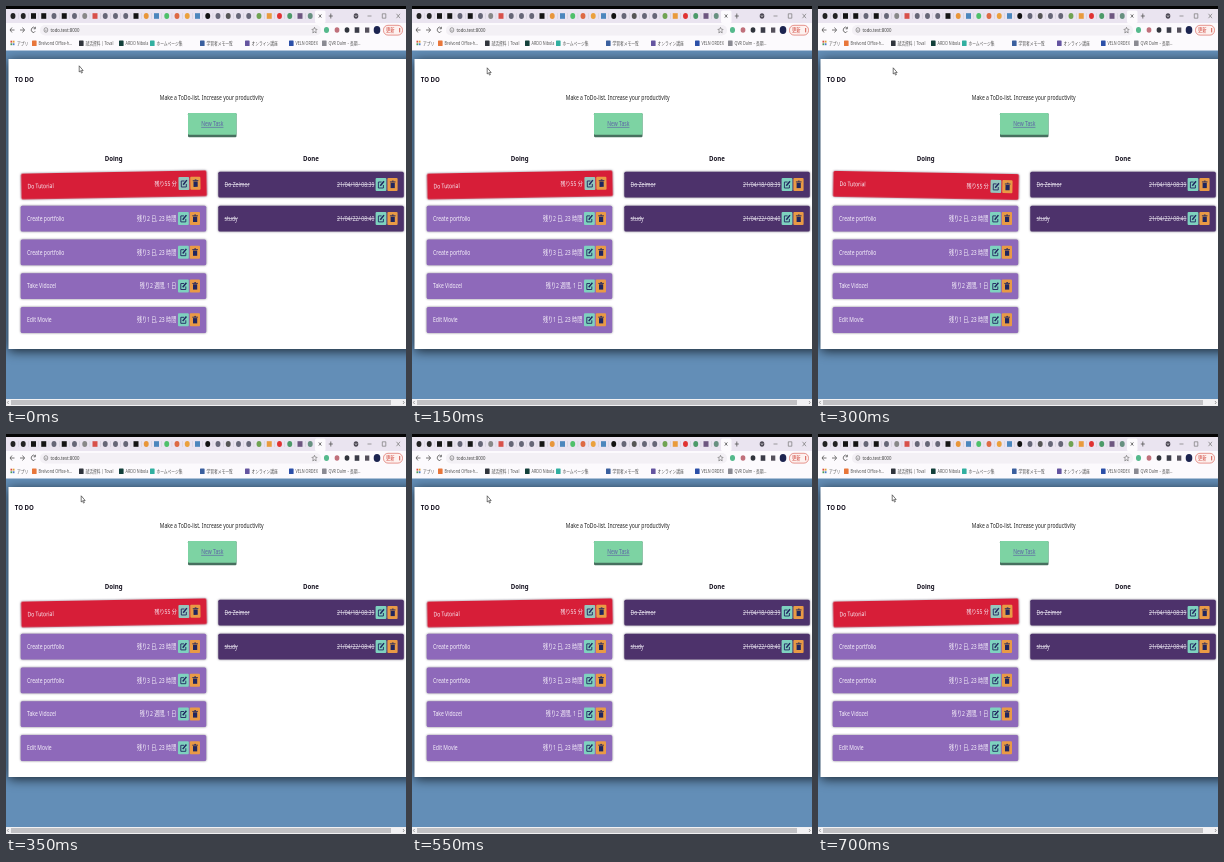
These frames come from a looping animation (400x400 px, 750 ms). An HTML page:

```html
<!DOCTYPE html>
<html lang="ja">
<head>
<meta charset="utf-8">
<style>
  html, body { margin: 0; width: 100%; height: 100%; overflow: hidden; }
  svg { display: block; width: 400px; height: 400px; font-family: "Noto Sans", "Noto Sans CJK JP", "Noto Sans CJK", sans-serif; }
  .panel { filter: drop-shadow(0 2px 6px rgba(0, 0, 0, .75)); }
  .card { filter: drop-shadow(0 .8px 1.3px rgba(20, 10, 40, .55)); }
</style>
</head>
<body>
<svg id="stage" viewBox="0 0 400 400"></svg>
<script>
const LOOP = 750, STEP = 50;
const SQUEEZE = 0.78; // the whole screen is shown narrower than it is tall

const rect = (x, y, w, h, fill, more = '') =>
  `<rect x="${x}" y="${y}" width="${w}" height="${h}" fill="${fill}" ${more}/>`;
const dot = (x, y, r, fill) =>
  `<ellipse cx="${x}" cy="${y}" rx="${r * .85}" ry="${r}" fill="${fill}"/>`;
const line = (d, color = '#555', width = .8) =>
  `<path d="${d}" fill="none" stroke="${color}" stroke-width="${width}"/>`;
const text = (x, y, str, fill, size = 6.5, more = '') =>
  `<text transform="translate(${x} ${y}) scale(${SQUEEZE} 1)" font-size="${size}" fill="${fill}" ${more}>${str}</text>`;

function actions(x, y, green) {
  const ink = '#20265f';
  return rect(x, y, 10.8, 13, green, 'rx="1"') + rect(x + 11.8, y, 10.2, 13, '#e99a45', 'rx="1"') +
    line(`M${x + 6} ${y + 4}h-3.2v6h5v-3`, ink, .9) +
    line(`M${x + 4.7} ${y + 7.8}l3.7 -4.6`, ink, 1.5) +
    rect(x + 15, y + 4.8, 4.2, 5.3, ink) +
    line(`M${x + 14.3} ${y + 3.9}h5.6m-3.6 -.8h1.7`, ink, .9);
}

function card(x, y, fill, title, when, done) {
  const strike = done ? 'text-decoration="line-through"' : '';
  const ink = done ? '#e5dfec' : '#f7f2fb';
  const right = x + (done ? 156 : 155.5);
  return rect(x, y, 185.5, 25.8, fill, 'rx="1.5" class="card"') +
    text(x + 6.3, y + 15, title, ink, 6.5, strike) +
    text(right, y + 15, when, ink, 6.5, `text-anchor="end" ${strike}`) +
    actions(x + 157.3, y + 6.2, fill === RED ? '#94c6bd' : '#7ed2bf');
}

function tabs() {
  const colors = ['#222', '#222', '#151515', '#151515', '#667', '#151515', '#667', '#888', '#d8504a', '#667',
    '#667', '#667', '#151515', '#e8963a', '#4b86bd', '#4fc06a', '#dd6a43', '#eba13c', '#4b86bd', '#111',
    '#667', '#555', '#667', '#667', '#70a352', '#e99b3c', '#e03232', '#4b9a68', '#6d5680', '#679080'];
  const square = [2, 3, 5, 8, 12, 14, 18, 25, 28];
  return colors.map((c, i) => {
    const x = 7 + i * 10.25;
    return (square.includes(i) ? rect(x - 2.5, 7.2, 5, 5.6, c) : dot(x, 10, 2.9, c)) +
      rect(x + 5, 7, .4, 6, '#c8c2d0');
  }).join('');
}

function bookmarks() {
  const items = [
    [26, '#e8763a', 'Brelvond Office-h…'], [73, '#30343c', '就活資料 | Toval'],
    [113, '#123f3a', 'ARDO Nibola'], [144, '#31afa0', 'ホームページ集'],
    [194, '#3a5f9e', '学習者メモ一覧'], [239, '#6454a0', 'オンライン講座'],
    [283, '#2b4fa8', 'VELN ORDEX'], [316, '#8a8a92', 'QVR Dalm・長期…']];
  const apps = ['#d84a3c', '#e0a030', '#4a9a55', '#4a7ac8'];
  return apps.map((c, i) => rect(4.5 + i % 2 * 2.3, 34.7 + (i >> 1) * 2.6, 1.7, 1.9, c)).join('') +
    text(11, 39.2, 'アプリ', '#555', 4.8) +
    items.map(([x, c, name]) => rect(x, 34.5, 4.6, 5.6, c, 'rx=".6"') +
      text(x + 6.5, 39.2, name, '#555', 4.8)).join('');
}

function browser() {
  return rect(0, 0, 400, 44.5, '#fcfafd') + rect(0, 3, 400, 14, '#eae4f0') + rect(0, 0, 400, 3, '#050505') +
    tabs() + rect(309, 4.5, 10.5, 12.5, '#fcfafd', 'rx="1.5"') +
    line('M312.8 8.4l2.6 3.2m0 -3.2l-2.6 3.2M324.8 7.5v5m-2 -2.5h4') +
    dot(350, 10, 2.7, '#4d4954') + line('M349 9.4l1 1.3l1 -1.3', '#fff', .7) +
    line('M361.5 10h4M376.3 7.8h3.5v4.4h-3.5zM390.5 7.8l3.5 4.4m0 -4.4l-3.5 4.4', '#777', .7) +
    line('M8.5 24h-4.5m2 -2.5l-2 2.5l2 2.5M14 24h4.5m-2 -2.5l2 2.5l-2 2.5') +
    line('M29 22.2a2.1 2.6 0 1 0 .2 3M29.4 20.8v2h-1.8') +
    rect(34, 19, 281, 10.5, '#f3f0f5', 'rx="5"') +
    line('M41.8 24a1.9 2.3 0 1 0 -3.8 0a1.9 2.3 0 1 0 3.8 0M39.9 23.6v1.8', '#666', .6) +
    text(44.5, 26.2, 'todo.test:8000', '#444', 5.5) +
    line('M308.5 21.3l.8 1.9l1.8 .2l-1.3 1.4l.4 2.1l-1.7 -1.1l-1.7 1.1l.4 -2.1l-1.3 -1.4l1.8 -.2z', '#666', .6) +
    dot(320.5, 24, 3, '#55b98c') + dot(331, 24, 2.8, '#c0707b') + dot(341, 24, 2.8, '#30343c') +
    rect(348.7, 21.3, 4.6, 5.5, '#3b3c48') + rect(359, 21.5, 4.3, 5.2, '#55515c') + dot(371, 24, 3.9, '#1c2450') +
    rect(377.5, 19.3, 19, 9.8, '#fdf1ef', 'rx="4.5" stroke="#dc6a60" stroke-width=".7"') +
    text(380, 26.2, '更新', '#d0483e', 5.5) + line('M393.7 22v4.4', '#d0483e', .9) +
    bookmarks();
}

const RED = '#d71e38', PURPLE = '#8e69ba', DARK = '#4d326b';
const bold = 'font-weight="700"', middle = 'text-anchor="middle"';
const todo = [
  ['Create portfolio', '残り2 日, 23 時間'], ['Create portfolio', '残り3 日, 23 時間'],
  ['Take Vidozel', '残り2 週間, 1 日'], ['Edit Movie', '残り1 日, 23 時間']];
const finished = [['Do Zelmor', '21/04/18/ 08:39'], ['study', '21/04/22/ 08:40']];

stage.innerHTML =
  rect(0, 0, 400, 400, '#638eb7') +
  rect(2.5, 53, 410, 290, '#fff', 'class="panel"') +
  browser() +
  text(8.8, 76.3, 'TO DO', '#171320', 7.8, bold) +
  text(205.7, 94, 'Make a ToDo-list. Increase your productivity', '#222', 6.5, middle) +
  rect(182, 107, 48.5, 24.3, '#47705f', 'rx="1.2"') + rect(182, 107, 48.5, 21.8, '#7dd3a3', 'rx="1.2"') +
  text(206.3, 119.8, 'New Task', '#5d62a6', 6.5, `${middle} text-decoration="underline"`) +
  text(107.7, 154.6, 'Doing', '#171320', 7.8, `${bold} ${middle}`) +
  text(305, 154.6, 'Done', '#171320', 7.8, `${bold} ${middle}`) +
  todo.map(([title, when], i) => card(14.7, 199.7 + i * 33.8, PURPLE, title, when)).join('') +
  finished.map(([title, when], i) => card(212.3, 165.8 + i * 33.9, DARK, title, when, true)).join('') +
  `<g id="urgent">${card(14.7, 166, RED, 'Do Tutorial', '残り55 分')}</g>` +
  rect(0, 393, 400, 7, '#f1f1f3') + rect(5, 394, 380, 5, '#c1c1c4') +
  line('M2.6 395l-1.2 1.5l1.2 1.5M397 395l1.2 1.5l-1.2 1.5', '#777', .7) +
  `<path id="pointer" d="M0 0v6.2l1.3 -1.2l1 2.3l.9 -.5l-.9 -2.1h1.7z" fill="#fff" stroke="#222" stroke-width=".6"/>`;

const tilt = [-1, 1, 0, -1, -1, 0, 1, -1, 1, 0, 1, -1, 0, 1, -1];
const urgent = document.getElementById('urgent'), pointer = document.getElementById('pointer');

function draw(now) {
  const step = Math.floor(now % LOOP / STEP);
  const angle = tilt[step];
  const shift = angle ? .5 : 0;
  urgent.setAttribute('transform', `translate(${shift} ${angle > 0 ? .5 : 0}) rotate(${angle} 107.5 179)`);
  const drift = Math.min(step, 2, Math.max(1, 14.5 - step));
  const away = step === 14 ? 1 : drift;
  pointer.setAttribute('transform', `translate(${73.2 + away} ${59.8 + away})`);
  requestAnimationFrame(draw);
}
draw(performance.now());
</script>
</body>
</html>
```
